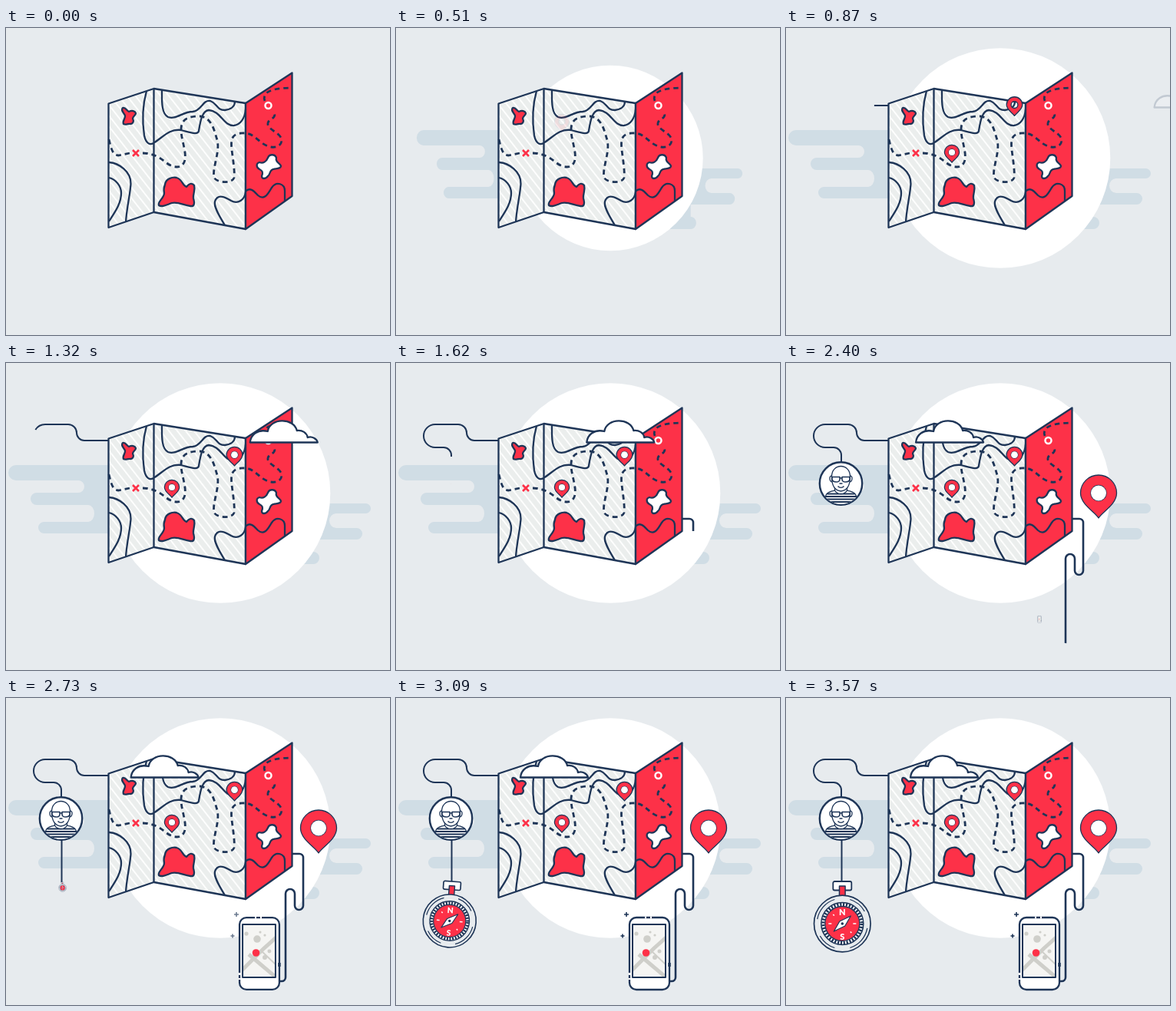
An HTML page for the animation above (3600 ms loop, 500 by 400 pixels).

```html
<!DOCTYPE html>
<html lang="en">
<head>
<meta charset="utf-8">
<title>Travel map</title>
<style>
html, body { margin: 0; width: 100%; height: 100%; overflow: hidden; background: #e7ebee; }
svg { display: block; width: 500px; height: 400px; }
.ink { fill: none; stroke: #1e3557; stroke-width: 2.3; stroke-linejoin: round; }
.red { fill: #fd3148; }
.white { fill: #fff; }
.thin { stroke-width: 1.3; }
.dash { stroke-width: 2.8; stroke-dasharray: 6.5 5; }
.bar { fill: #d0dde5; }
.road { fill: none; stroke: #cfcfca; }
.grey { fill: #cfcfca; }
.small { stroke-width: 3; }
text { font: 900 11px Lato, sans-serif; fill: #fff; stroke: none; text-anchor: middle; }
</style>
</head>
<body>
<svg viewBox="0 0 500 400">
  <defs>
    <pattern id="stripes" width="8.6" height="20" patternUnits="userSpaceOnUse" patternTransform="rotate(-38)">
      <rect width="8.6" height="20" fill="#ebeeed"/>
      <rect width="1.8" height="20" fill="#fff"/>
    </pattern>
    <clipPath id="face"><circle r="27"/></clipPath>
    <clipPath id="screen"><rect x="-22" y="-39" width="43" height="69"/></clipPath>
    <path id="pin" fill-rule="evenodd"
      d="M0 32.500C-4 25-23.500 15-23.500 0A23.500 23.500 0 0 1 23.500 0C23.500 15 4 25 0 32.500ZM10 0A10 10 0 1 0-10 0A10 10 0 1 0 10 0Z"/>
  </defs>

  <g id="bars" class="bar">
    <path d="M150 133H13a10 10 0 0 0 0 20H94a8 8 0 0 1 0 16H40a8 8 0 0 0 0 16H107a8 11 0 0 1 0 22H49.500a7.500 7.500 0 0 0 0 15H150Z"/>
    <path d="M370 183H468.500a6.500 6.500 0 0 1 0 13H430a9 9.500 0 0 0 0 19H456.500a7.500 7.500 0 0 1 0 15H400V246a8 8 0 0 1 0 16H370Z"/>
  </g>
  <circle id="disc" class="white" cx="279" cy="169.500"/>

  <path id="wire" class="ink" style="stroke-width:2" pathLength="1"
    d="M133 101H102a10 10 0 0 1-10-10a11 11 0 0 0-11-11H51a15 15 0 0 0 0 30H62a10 10 0 0 1 10 10V130"/>
  <path id="rope" class="ink" style="stroke-width:2.600" pathLength="1"
    d="M372 203H382a5 5 0 0 1 5 5V270.500a5.500 5.500 0 0 1-11 0V255a6 6 0 0 0-12 0V364a5 5 0 0 1-5 5H356"/>
  <path id="string" class="ink" style="stroke-width:2" pathLength="1" d="M72.500 184V240"/>

  <g class="ink">
    <path fill="url(#stripes)" d="M133.500 98.500L192.500 79L312 98V262L192.500 240L133.500 260Z"/>
    <path class="red" d="M312 98L372.500 58.500V219L312 262Z"/>
    <path d="M192.500 79V240M183 82C178 100 177 120 180 140C182 150 187 153 192 150C205 142 212 131 228 133C240 136 250 140 251 134C253 122 255 108 264 107C280 108 283 128 297 127C305 126 311 118 312 106"/>
    <path d="M203 81C203 95 202 111 211 116C221 120 230 109 243 109C255 108 256 93 266 95C275 98 274 107 285 107C293 106 298 102 298 96"/>
    <path d="M134 175C147 176 163 187 162.500 203C162 215 157 235 156 253M134 195C143 197 150 206 150 215C150 230 140 242 134 252"/>
    <path d="M285 257C279 247 270 233 272 226C276 214 288 222 293 225C302 230 311 224 312 213C318 206 324 214 328 218C337 226 342 214 346 208C352 199 363 203 363 212V225"/>
    <path class="red" d="M152 104C156 103 157 108 160 109C164 107 168 108 169 111C169 114 165 115 165 118C167 122 165 125 162 125C158 124 156 127 153 125C151 121 156 118 155 114C153 110 149 107 152 104Z"/>
    <path class="red" d="M207 204C208 196 217 194 222 195C230 197 229 205 235 207C238 203 242 201 245 205C247 212 243 216 244 222C246 229 245 233 240 232C231 231 224 226 216 228C210 230 203 234 199 231C197 226 206 222 206 215C205 211 205 209 207 204Z"/>
    <path class="white" d="M341 169C343 164 350 164 352 169C350 175 357 176 358 180C357 185 349 182 346 185C343 187 344 191 341 193C338 197 333 197 333 193C335 188 334 186 330 184C325 181 326 176 330 175C335 177 339 174 341 169Z"/>
  </g>
  <g class="ink dash">
    <path d="M134 145C137 158 139 166 147 166L161 163M178 163C192 163 200 169 208 175C218 183 230 184 233 172C235 160 228 146 228 132C228 117 240 115 253 115C268 117 271 133 275 146C279 162 268 183 271 195C275 202 295 203 297 195C299 180 290 150 295 143C299 136 307 137 312 137C325 138 330 152 345 155C358 157 363 146 355 139C348 133 340 130 341 124C342 118 353 118 349 110"/>
    <path d="M337 95C333 84 345 78 372 78"/>
  </g>
  <path d="M165 159L173 167M173 159L165 167" stroke="#fd3148" stroke-width="2.600"/>
  <circle class="red" cx="341.500" cy="101" r="4" stroke="#fff" stroke-width="2.500"/>

  <g id="pinA"><use href="#pin" class="ink red small"/><circle class="white"/></g>
  <g id="pinB"><use href="#pin" class="ink red small"/><circle class="white"/></g>
  <g id="pinC"><use href="#pin" class="ink red thin"/><circle class="white" r="10"/></g>

  <path id="cloud" class="ink white" d="M0 103.500C1 93 10 86 23 89C26 71 57 71 61 88C68 87 74 91 75 97C81 95 87 99 88 103.500Z"/>

  <g id="portrait" class="ink thin">
    <circle class="white" r="27.700" style="stroke-width:2.400"/>
    <g clip-path="url(#face)">
      <path class="white" d="M-20 30V17C-19 11-12 10-7 9H7C12 10 19 11 20 17V30Z"/>
      <path d="M-18 13.500H18M-20 17H20M-20 20.500H20M-20 24H20" style="stroke-width:1.800"/>
      <path class="white" d="M-8 5V9C-5 15 5 15 8 9V5Z"/>
    </g>
    <path class="white" d="M-12-10C-16-10-15-2-11-2M12-10C16-10 15-2 11-2"/>
    <path class="white" d="M-12-9C-12-27 12-27 12-9C12 1 9 9 0 10C-9 9-12 1-12-9Z"/>
    <path class="white" style="stroke-width:1.600" d="M-11.500-8.500H-1.500V-5C-2-1-10-1-11.500-5ZM11.500-8.500H1.500V-5C2-1 10-1 11.500-5ZM-1.500-7H1.500"/>
    <path d="M-4 3.500C-2 6 2 6 4 3.500M-2 0H2"/>
  </g>

  <g id="phone" class="ink">
    <rect class="white" x="-26" y="-48" width="52" height="94" rx="9"/>
    <rect x="-22" y="-39" width="43" height="69" fill="#f5f5f3" stroke="none"/>
    <g clip-path="url(#screen)" stroke="none">
      <path class="road" stroke-width="5" d="M-24 22L6-8L24-24M-14 0L24 32"/>
      <path class="road" stroke-width="2" d="M3-4L24 16"/>
      <g class="grey">
        <circle cx="-3" cy="-20" r="4.800"/><circle cx="-17" cy="-27" r="2.600"/>
        <circle cx="1" cy="-29" r="1.600"/><circle cx="7" cy="-25" r="1.600"/>
        <circle cx="7" cy="4" r="3"/><circle cx="13" cy="-4" r="2.500"/>
      </g>
      <circle class="red" cx="-4.500" cy="-2" r="4.800"/>
    </g>
    <rect x="-22" y="-39" width="43" height="69" style="stroke-width:2"/>
    <path d="M-6-48H-4M1-48H3M-26 24V27M-26 31V33" style="stroke:#fff;stroke-width:3"/>
    <path d="M26 11V16" style="stroke-width:3.500"/>
  </g>
  <path id="sparks" class="ink" style="stroke-width:1.600" d="M297 282H303M300 279V285M292.500 310H297.500M295 307.500V312.500"/>

  <g id="compass" class="ink">
    <rect class="white" x="-12" y="-1" width="24" height="11.500" rx="2" style="stroke-width:1.800"/>
    <rect class="red" x="-3.800" y="5" width="7.600" height="13" style="stroke-width:1.500"/>
    <g transform="translate(0 54)">
      <circle r="36.800" fill="#e7ebee" style="stroke-width:1.700"/>
      <path class="thin" d="M-32.500-6A33 33 0 0 1-10-31.500M32.500 6A33 33 0 0 1 10 31.500M10-31.500A33 33 0 0 1 29-16M-10 31.500A33 33 0 0 1-29 16"/>
      <circle class="white" r="27.500" style="stroke-width:1.500"/>
      <circle r="25" style="stroke-width:4;stroke-dasharray:2.200 1.727"/>
      <circle class="red" r="22.500" style="stroke-width:1.300"/>
      <path d="M-18 0H-14M14 0H18M-12-12L-10.500-10.500M12 12L10.500 10.500" style="stroke:#fff;stroke-width:1.600"/>
      <text y="-11">N</text><text y="20.500">S</text>
      <path class="white" d="M11-10L3.500 3L-11 10L-3.500-3Z" style="stroke-width:1.200"/>
      <circle r="1.800" style="fill:#1e3557;stroke:none"/>
    </g>
  </g>
</svg>
<script>
const LOOP = 3600;
const $ = id => document.getElementById(id);
const ramp = (t, start, length) => Math.min(1, Math.max(0, (t - start) / length));
const easeOut = p => 1 - (1 - p) ** 3;
const easeInOut = p => p < 0.5 ? 4 * p ** 3 : 1 - 4 * (1 - p) ** 3;
const backOut = p => 1 + 2.7 * (p - 1) ** 3 + 1.7 * (p - 1) ** 2;

function place(id, x, y, sx = 1, sy = sx, angle = 0) {
  const visible = Math.abs(sx) > 0.001 && Math.abs(sy) > 0.001;
  $(id).style.display = visible ? '' : 'none';
  $(id).setAttribute('transform', `translate(${x} ${y}) rotate(${angle}) scale(${sx} ${sy})`);
}

function draw(id, p) {
  $(id).style.display = p ? '' : 'none';
  $(id).setAttribute('stroke-dasharray', `${p} 2`);
}

function dropPin(id, t, start, x, y, size) {
  const p = ramp(t, start, 300);
  place(id, x, y - 40 * (1 - easeInOut(p)), size);
  $(id).style.opacity = Math.min(1, p * 2.5);
  $(id).lastElementChild.setAttribute('r', 10 * easeOut(ramp(t, start + 200, 200)));
}

function render(t) {
  const spread = easeOut(ramp(t, 180, 620));
  place('bars', 239 * (1 - spread), 0, spread, 1);
  $('disc').setAttribute('r', 143.3 * easeOut(ramp(t, 180, 720)));

  dropPin('pinA', t, 500, 216, 162, 0.41);
  dropPin('pinB', t, 720, 297.5, 119.7, 0.44);
  place('pinC', 407, 169.5, backOut(ramp(t, 1888, 465)), 1);

  place('cloud', 162 + 390 * (1 - ramp(t, 720, 2280)) ** 3, 0);
  $('cloud').style.opacity = ramp(t, 780, 500);

  draw('wire', ramp(t, 781, 880));
  draw('rope', ramp(t, 1516, 920));
  draw('string', ramp(t, 2500, 220));

  place('portrait', 71.5, 157, backOut(ramp(t, 1620, 270)));
  place('phone', 330, 334, easeOut(ramp(t, 2388, 400)));
  $('sparks').style.opacity = ramp(t, 2600, 200);

  const swing = 4.8 * Math.sin(Math.PI * (t - 2870) / 700);
  place('compass', 73.3, 240, easeOut(ramp(t, 2700, 650)), undefined, swing);
}

const begin = performance.now();
function tick() {
  render((performance.now() - begin) % LOOP);
  requestAnimationFrame(tick);
}
tick();
</script>
</body>
</html>
```
